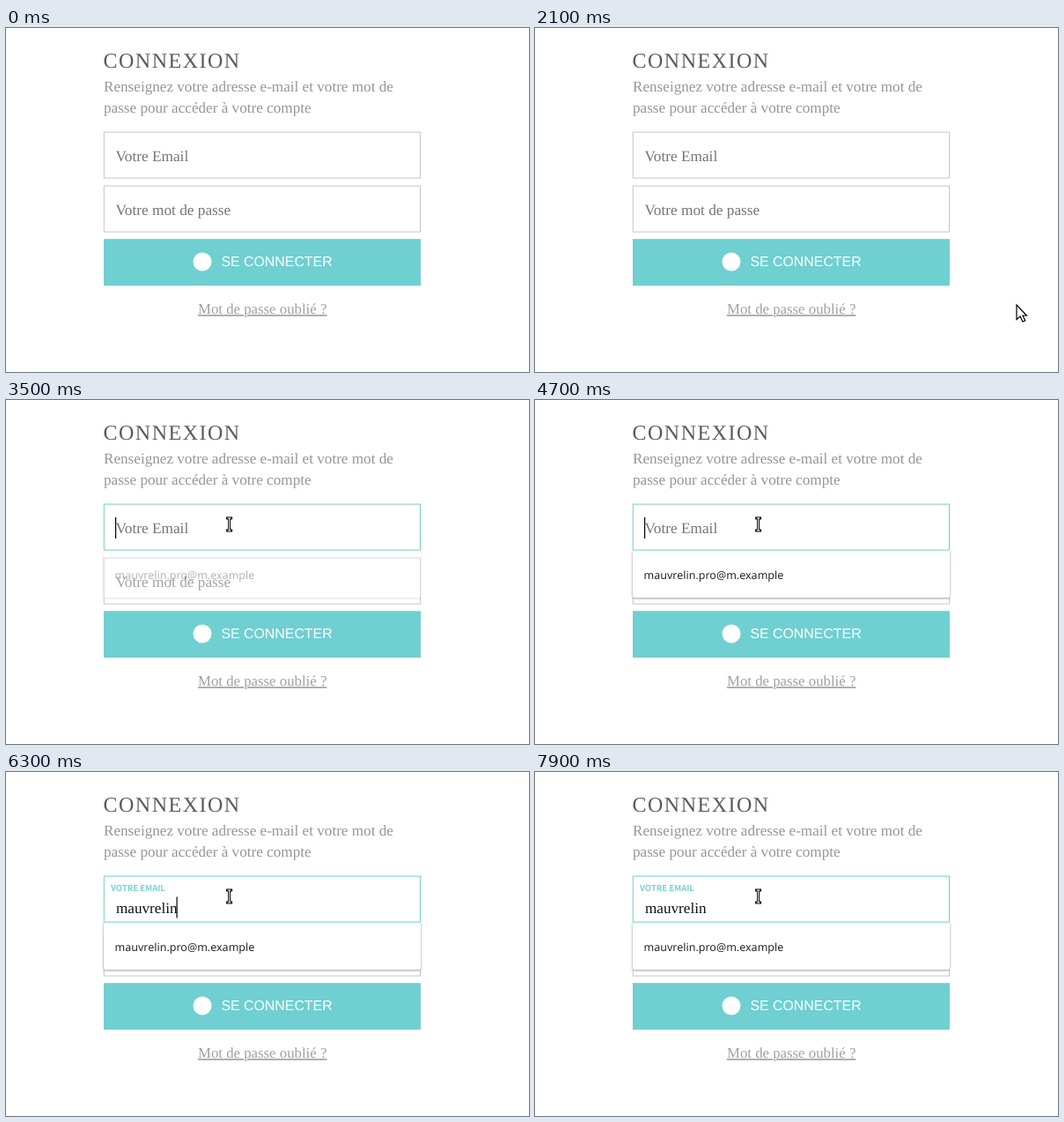
Recreate the animation shown at these times as an HTML page. Size 594 by 390 pixels, loop 8000 ms.

```html
<!DOCTYPE html>
<html lang="fr">
<head>
<meta charset="utf-8">
<title>Connexion</title>
<style>
  html, body { margin: 0; width: 100%; height: 100%; overflow: hidden; background: #fff; }
  svg { display: block; width: 594px; height: 390px; }
  text { white-space: pre; text-rendering: geometricPrecision; }
  .serif { font-family: "Liberation Serif", "Times New Roman", serif; font-size: 17.15px; }
  .title { font: 24px "Liberation Serif", "Times New Roman", serif; letter-spacing: 1.5px; fill: #5a5a5a; }
  .intro { fill: #969696; }
  .hint { font-size: 17.3px; fill: #757575; }
  .link { font-size: 16.8px; fill: #a0a0a0; text-decoration: underline; }
  .field { fill: #fff; stroke: #c6c6c6; }
  .button { font: 15.9px "Liberation Sans", Arial, sans-serif; fill: #fff; }
  .label { font: 700 9.5px "Noto Sans CJK JP", "Noto Sans CJK SC", "Noto Sans", sans-serif; fill: #76d1d2; }
  .suggestion { font: 12.5px "Noto Sans", sans-serif; fill: #27272b; }
</style>
</head>
<body>
<svg viewBox="0 0 594 390">
  <defs>
    <filter id="shadow" x="-5%" y="-20%" width="110%" height="150%">
      <feDropShadow dx="0" dy="1" stdDeviation="1.5" flood-color="#000" flood-opacity=".38"/>
    </filter>
    <clipPath id="below"><rect x="100" y="171" width="390" height="70"/></clipPath>
  </defs>

  <text class="title" x="110.5" y="45">CONNEXION</text>
  <text class="serif intro" x="111" y="72">Renseignez votre adresse e-mail et votre mot de</text>
  <text class="serif intro" x="111" y="96">passe pour accéder à votre compte</text>

  <rect id="emailBox" class="field" x="111.3" y="118.1" width="359.2" height="52"/>
  <text id="emailHint" class="serif hint" x="124.5" y="150.5">Votre Email</text>
  <text id="label" class="label" x="119" y="135">VOTRE EMAIL</text>
  <text id="typed" class="serif" x="125" y="160" fill="#111"></text>
  <path id="squiggle" fill="none" stroke="#e5484d" stroke-width="1"/>
  <rect id="caret" width="1.2" height="24" fill="#000"/>

  <rect class="field" x="111.3" y="179.1" width="359.2" height="52"/>
  <text class="serif hint" x="124.5" y="211.5">Votre mot de passe</text>

  <rect x="111" y="239.2" width="360" height="53" fill="#6fcfd1"/>
  <circle cx="223" cy="265" r="10.5" fill="#fff"/>
  <text class="button" x="244.4" y="270">SE CONNECTER</text>
  <text class="serif link" x="218" y="324">Mot de passe oublié ?</text>

  <g clip-path="url(#below)">
    <g id="menu">
      <rect x="111" y="168" width="360" height="56" rx="2" fill="#fff" filter="url(#shadow)"/>
      <text class="suggestion" x="123.5" y="203">mauvrelin.pro@m.example</text>
    </g>
  </g>

  <path id="arrow" d="M0 0V16.5L4 13L7 19L9.7 17.8L7 12H11.5Z" fill="#fff" stroke="#000" stroke-width="1.2"/>
  <g id="beam" fill="none">
    <path d="M-2-7h4M0-7v14M-2 7h4" stroke="#000" stroke-width="3" stroke-linecap="square"/>
    <path d="M-2-7h4M0-7v14M-2 7h4" stroke="#fff" stroke-width="1"/>
  </g>
</svg>
<script>
const LOOP = 8000, STEP = 100;
const WORD = "mauvrelin";
const KEY_TIMES = [4800, 5500, 5600, 5700, 5900, 6000, 6100, 6200, 6300];
const SLASH = 6900, ERASE = 7900;
const CARET_OFF = [[4000, 4600], [5400, 5500], [7500, 8000]];

const el = id => document.getElementById(id);
const set = (id, attrs) => {
  for (const name in attrs) el(id).setAttribute(name, attrs[name]);
};
const show = (id, on) => set(id, { visibility: on ? "visible" : "hidden" });
const clamp = v => Math.max(0, Math.min(1, v));
const ramp = (t, from, to) => clamp((t - from) / (to - from));
const within = (t, from, to) => t >= from && t < to;

function drawCursor(t) {
  const p = (1 - Math.cos(Math.PI * ramp(t, 2100, 2800))) / 2;
  const x = 547 - 293.4 * p, y = 314 - 173 * p * p;
  const overField = x < 471 && (within(y, 118, 171) || within(y, 179, 232));
  const at = { transform: `translate(${x} ${y})` };
  set("arrow", at);
  set("beam", at);
  show("arrow", t >= 2100 && !overField);
  show("beam", t >= 2100 && overField);
}

function drawEmail(t) {
  const count = KEY_TIMES.filter(k => t >= k).length;
  const slash = within(t, SLASH, ERASE);
  const focused = t >= 3500;
  const typed = el("typed");
  typed.textContent = WORD.slice(0, count) + (slash ? "/" : "");
  const width = count ? typed.getComputedTextLength() : 0;

  el("emailBox").style.stroke = focused ? "#6fcfd1" : "";
  show("emailHint", !count);
  const rise = ramp(t, 4700, 5100);
  set("label", { opacity: rise, transform: `translate(0 ${6 * (1 - rise) ** 2})` });
  set("caret", { x: 124 + width, y: count ? 141.5 : 133 });
  show("caret", focused && !CARET_OFF.some(([a, b]) => within(t, a, b)));

  let wave = "M125 163";
  for (let x = 127, up = true; x <= 194; x += 2, up = !up) wave += `L${x} ${up ? 161.5 : 164}`;
  set("squiggle", { d: wave });
  show("squiggle", slash);
}

function drawMenu(t) {
  const opening = ramp(t, 3400, 3700);
  const closing = (1 - ramp(t, 6800, 7300)) ** 1.3;
  const opacity = t >= ERASE ? 1 : t < SLASH ? opening : closing;
  const scale = within(t, SLASH, ERASE) ? 1 - .03 * ramp(t, 6800, 7000) : 1;
  set("menu", {
    opacity,
    transform: `translate(291 198) scale(${scale}) translate(-291 -198)`
  });
}

function render(now) {
  const t = Math.floor(now % LOOP / STEP) * STEP;
  drawCursor(t);
  drawEmail(t);
  drawMenu(t);
}

const start = performance.now();
function tick() {
  render(performance.now() - start);
  requestAnimationFrame(tick);
}
tick();
</script>
</body>
</html>
```
